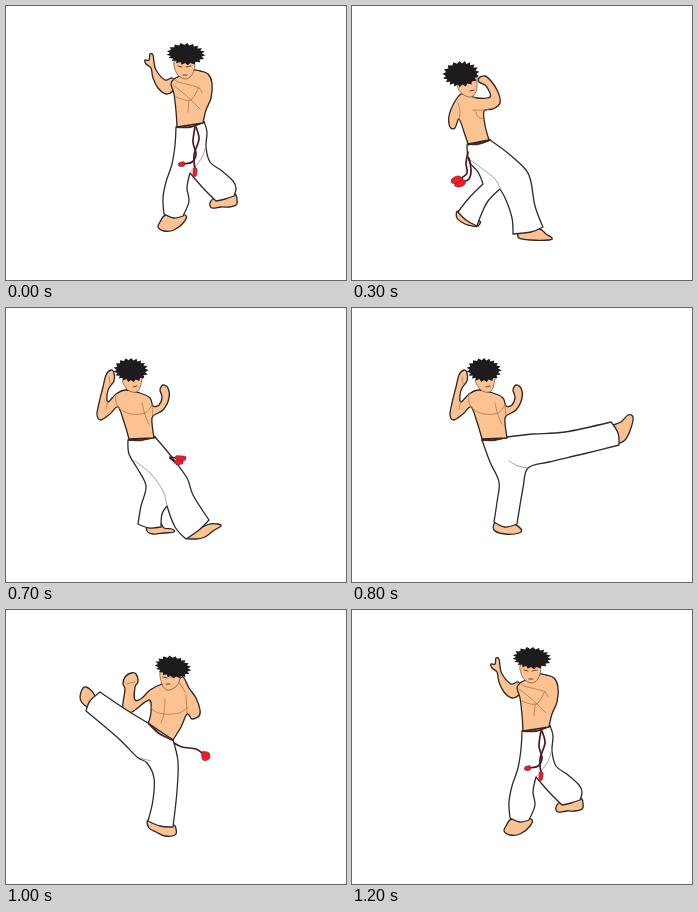
Write an HTML page that moves like this. It is 340x274 px and loops after 1700 ms.

```html
<!DOCTYPE html>
<html lang="en">
<head>
<meta charset="utf-8">
<title>Capoeira kick</title>
<style>
  html, body { margin: 0; width: 100%; height: 100%; overflow: hidden; background: #fff; }
  svg { display: block; width: 100vw; height: 100vh; }
  path { fill: none; stroke-linejoin: round; stroke-linecap: round; }
  .skin { fill: #fcc292; stroke: #2b2726; stroke-width: 1.3; }
  .face { fill: #fcc292; stroke: #6b4a38; stroke-width: .7; }
  .pants { fill: #fff; stroke: #2b2b2d; stroke-width: 1.3; }
  .cuff { fill: #97999c; stroke: #2b2b2d; stroke-width: 1; }
  .hair { fill: #1d1b1d; }
  .line { stroke: #a87a58; stroke-width: .8; }
  .fold { stroke: #8b8b8e; stroke-width: .8; }
  .mark { stroke: #4a3025; stroke-width: .9; }
  .belt { stroke: #4c2422; stroke-width: 2; }
  .cord { stroke: #4d161b; stroke-width: 1.7; }
  .red { fill: #ee1f2d; stroke: #8c1a22; stroke-width: .7; }
</style>
</head>
<body>
<svg id="stage" viewBox="0 0 340 274"></svg>
<script>
const NS = 'http://www.w3.org/2000/svg';
const OPEN = ['line', 'fold', 'mark', 'belt', 'cord'];
const LOOP = 1700;

// Smooth curve through "x,y" points; a trailing ! makes a sharp corner.
function curve(text, closed, dx, dy) {
  const pts = text.split(' ').map(s => {
    const [x, y] = s.replace('!', '').split(',').map(Number);
    return { x: x + dx, y: y + dy, sharp: s.endsWith('!') };
  });
  const n = pts.length;
  const at = i => closed ? pts[(i + n) % n] : pts[Math.max(0, Math.min(n - 1, i))];
  const handle = (i, sign) => {
    const p = at(i), a = at(i - 1), b = at(i + 1), k = p.sharp ? 0 : sign / 6;
    return `${p.x + (b.x - a.x) * k} ${p.y + (b.y - a.y) * k}`;
  };
  let d = `M${pts[0].x} ${pts[0].y}`;
  for (let i = 0; i < (closed ? n : n - 1); i++)
    d += `C${handle(i, 1)} ${handle(i + 1, -1)} ${at(i + 1).x} ${at(i + 1).y}`;
  return closed ? d + 'Z' : d;
}

// Spiky ellipse: "cx,cy rx,ry tilt".
function spikes(text, dx, dy) {
  const [cx, cy, rx, ry, tilt] = text.split(/[ ,]/).map(Number);
  const c = Math.cos(tilt * Math.PI / 180), s = Math.sin(tilt * Math.PI / 180);
  let d = '';
  for (let i = 0; i < 38; i++) {
    const a = i / 38 * 2 * Math.PI;
    const r = (i % 2 ? 1.02 : .83) + Math.sin(i * 12.9) * .06;
    const x = rx * r * Math.cos(a), y = ry * r * Math.sin(a);
    d += `${i ? 'L' : 'M'}${(cx + dx + x * c - y * s).toFixed(1)} ${(cy + dy + x * s + y * c).toFixed(1)}`;
  }
  return d + 'Z';
}

const shift = (parts, dx, dy) => parts.map(([cls, text]) => [cls, text, dx, dy]);

const guard = [
  ['skin', '166,72 159,74 150,64 148,56 147,49 144,48 143,54 139,54 140,58 145,62 147,72 152,82 160,88 167,85 172,78'],
  ['skin', '176,69 168,73 165,78 168,88 170,105 171,121! 197,117! 200,104 205,92 206,77 202,68 194,65 187,64'],
  ['line', '166,71 172,76 184,79 193,82 196,87'],
  ['line', '167,79 176,86 186,95 194,103'],
  ['line', '170,91 179,94 186,93 193,81'],
  ['line', '183,94 182,106'],
  ['face', '169,54 187,54 188,64 183,72 176,72 170,66'],
  ['mark', '172,60 176,61'], ['mark', '180,61 185,60'], ['mark', '177,69 181,69'],
  ['hair', '180,48 19,11 -2'],
];
const guardLegs = [
  ['skin', '160,209 154,216 152,221 158,225 168,224 178,216 179,209'],
  ['skin', '210,191 204,197 206,202 215,201 223,201 230,199 231,194 228,188'],
  ['pants', '170,121! 198,116! 201,126 200,141 204,156 216,165 227,175 230,182 228,190! 219,193 210,195! 197,182 184,167! 181,182 183,195 177,210! 168,212 158,208! 157,192 160,176 166,158 169,139'],
  ['fold', '200,140 195,153 184,167'],
  ['belt', '171,121 184,121 198,116'],
  ['cord', '190,121 193,133 188,149 189,164'],
  ['cord', '189,121 187,136 190,148 186,156 177,158'],
  ['red', '178,156 173,157 173,160 178,160'],
  ['red', '188,162 187,169 190,170 191,163'],
];

const left = [
  ['skin', '113,91 122,90 134,82 136,73 141,67 145,67 145,75 139,82 133,93 126,100 119,99 113,96'],
  ['skin', '102,75 89,76 82,82 81,96 84,108 85,118 83,127! 106,133! 109,118 113,101 120,92 120,84 115,80 110,80'],
  ['line', '92,90 91,98 88,107'], ['line', '88,109 99,103 107,95 117,91'],
  ['line', '91,98 104,91 112,86'], ['line', '110,101 108,112 105,121'],
  ['face', '100,68 119,66 119,76 115,81 109,84 103,80 101,76'],
  ['mark', '108,73 112,73'], ['mark', '115,72 118,71'], ['mark', '112,79 115,78'],
  ['hair', '110,62 17,12 6'],
];
const leftLegs = [
  ['cord', '86,150 81,158 79,164'], ['cord', '84,154 79,160 75,164'],
  ['red', '67,165 74,162 77,166 71,170 67,169'],
  ['red', '75,167 82,165 82,170 77,172 73,171'],
  ['skin', '72,221 69,228 76,235 84,238 93,238 95,234 91,229'],
  ['skin', '103,216 112,220 123,219 127,216 125,212 119,211'],
  ['pants', '84,126! 106,133! 107,154 112,177 118,199 122,214! 112,217 99,219 90,231! 78,227 66,215! 77,198 88,176 80,155 76,143 79,132'],
  ['fold', '111,172 110,188 104,205 98,219'],
  ['belt', '84,127 94,132 106,133'],
];

const back = [
  ['skin', '109,88 102,97 97,110 98,121 103,122 107,113 112,126 116,138! 137,134! 133,119 132,105 141,103 148,97 146,86 139,75 133,70 127,72 127,76 133,79 136,83 138,91 125,92 116,89'],
  ['line', '106,97 108,105 107,114'], ['line', '121,104 133,104 140,102'],
  ['line', '123,92 114,88'], ['line', '124,106 126,111 132,113'],
  ['face', '106,74 123,67 125,77 124,86 119,91 112,89 107,84'],
  ['mark', '114,77 117,76'], ['mark', '120,75 123,74'], ['mark', '118,85 122,84'],
  ['hair', '109,68 18,13 -14'],
];
const backLegs = [
  ['skin', '107,205 105,212 113,218 120,220 126,220 127,214'],
  ['skin', '168,226 167,232 178,234 197,234 200,232 194,228 187,223'],
  ['pants', '115,139! 138,134! 157,148 174,164 179,176 183,200 191,221! 179,226 161,228! 160,212 154,194 148,183! 136,195 129,209 125,220! 114,214 106,206! 117,192 131,178! 126,166 117,155'],
  ['fold', '118,154 132,164 143,173 149,184'],
  ['belt', '116,138 126,138 138,134'],
  ['cord', '116,146 114,157 115,167 108,173'], ['cord', '117,152 119,164 117,173 111,176'],
  ['red', '100,173 106,170 111,173 107,177 100,177'],
  ['red', '104,177 112,174 113,178 108,181 103,180'],
];

const open = [
  ['skin', '119,82 110,86 102,94 101,87 103,80 108,73 108,65 105,62 100,67 97,79 93,95 91,107 95,112 104,106 112,99 118,114 123,131! 148,130! 146,115 147,108 157,102 163,90 162,80 157,77 154,82 156,89 153,97 147,98 144,90 134,85'],
  ['line', '110,86 110,94 114,101 125,106 139,105 146,97'], ['line', '136,95 139,107 143,116'],
  ['line', '102,93 100,101'], ['line', '146,97 147,108'], ['line', '103,69 104,76'],
  ['face', '117,70 135,65 135,76 132,83 126,84 120,80'],
  ['mark', '123,71 127,71'], ['mark', '130,70 134,69'], ['mark', '127,79 131,78'],
  ['hair', '125,62 17,12 -6'],
];
const openLegs = [
  ['skin', '142,217 141,223 147,226 158,225 168,224 166,221 158,220 154,215'],
  ['skin', '180,229 190,231 199,229 207,223 215,218 211,216 201,217'],
  ['pants', '122,132! 149,129! 165,148 181,170 187,187 203,212! 193,222 180,231! 169,219 161,198! 156,206 155,219! 143,220 132,216! 135,198 140,178 131,160 123,146'],
  ['fold', '129,153 145,166 157,183 161,198'],
  ['belt', '123,132 136,132 149,129'],
  ['cord', '164,149 170,150'], ['cord', '164,150 169,154'],
  ['red', '170,148 176,148 180,149 178,153 171,152'],
  ['red', '168,153 174,152 177,155 171,157'],
];

const highKick = [
  ['skin', '154,79 140,84 127,96 127,87 133,80 137,74 134,71 126,71 121,76 120,90 118,107 124,112 138,103 141,116 139,140 169,133 174,105 187,112 198,118 203,108 207,95 207,83 201,77 196,78 201,90 199,100 190,99 176,86'],
  ['line', '137,89 138,96 145,103 155,106'], ['line', '127,95 124,103'], ['line', '125,75 130,78'],
  ['face', '150,66 160,66 160,80 154,78'],
  ['hair', '154,64 9,13 0'],
  ['cord', '170,129 180,137 184,142 192,143'], ['cord', '169,131 177,139 182,147 190,150'],
  ['red', '193,142 200,141 202,144 198,147 192,146'],
  ['red', '189,147 196,147 199,149 194,152 189,151'],
  ['skin', '149,214 144,222 153,226 167,225 171,221'],
  ['pants', '160,49! 170,46 185,51! 180,85 175,108 168,130 174,145 184,165 185,184 177,203 169,221! 157,219 144,207! 152,192 161,173! 148,163 138,145 140,134 149,122 155,96 159,68'],
  ['fold', '140,143 148,155 164,166'], ['fold', '169,128 167,146'],
  ['cuff', '160,49 162,44 173,44 184,48 185,52 181,56 170,54'],
  ['skin', '169,48 171,42 167,37 171,33 178,32 183,35 180,40 178,48'],
  ['line', '171,41 180,40'],
];

const low = [
  ['skin', '157,68 145,74 137,82 130,84 130,71 133,66 131,58 126,57 120,61 118,68 120,73 118,87 118,97 127,96 144,84 146,96 143,108! 168,124! 176,111 182,98 187,103 194,100 195,94 191,82 184,72 178,61 171,65'],
  ['line', '144,84 148,94 159,98 174,97 183,91'], ['line', '160,83 159,97 156,107'],
  ['line', '181,79 182,97'], ['line', '121,68 130,66'], ['line', '174,66 180,76'],
  ['face', '156,55 174,56 174,66 169,72 162,74 157,68'],
  ['mark', '158,61 162,62'], ['mark', '166,61 170,60'], ['mark', '161,68 165,68'],
  ['hair', '168,51 18,11 5'],
];
const lowLegs = [
  ['cord', '167,126 175,132 188,133 199,139'], ['cord', '168,130 179,135 189,136 197,146'],
  ['red', '199,139 204,141 203,148 199,148'],
  ['red', '196,145 201,146 202,152 198,153'],
  ['skin', '54,151 46,153 45,158 51,164 57,171 60,168 60,160'],
  ['skin', '143,210 143,218 150,222 159,226 169,225 170,219 166,214'],
  ['pants', '143,106! 168,124! 170,145 168,181 166,217! 154,215 142,210! 146,192 148,168 142,145 134,136 120,139 106,147 87,152 74,168! 60,161 52,149! 70,139 96,128 119,115'],
  ['fold', '134,136 128,137'],
  ['belt', '144,108 155,118 168,124'],
  ['fold', '143,109 142,113 146,114'], ['fold', '158,121 160,126 163,123'],
];

const stepLegs = [
  ['cord', '101,146 97,157 96,169 91,173'], ['red', '84,172 93,170 96,175 88,179'],
  ['skin', '92,212 88,219 96,226 107,227 110,222'],
  ['skin', '146,221 147,227 160,229 173,228 175,225 165,219'],
  ['pants', '101,138! 124,134! 139,153 152,172 158,194 167,218! 154,223 141,222! 138,204 128,184! 118,199 110,222! 99,220 89,212! 99,195 112,178! 105,163 100,150'],
  ['fold', '107,157 121,170 128,184'], ['belt', '102,138 112,138 124,134'],
];
const crossLegs = [
  ['red', '111,167 118,165 120,170 114,172'], ['cord', '126,145 122,156 118,166'],
  ['skin', '117,210 114,217 123,222 133,223 136,218'],
  ['skin', '168,226 168,232 180,235 197,234 200,231 188,223'],
  ['pants', '125,130! 150,128! 165,146 176,166 182,194 192,220! 180,226 162,228! 160,210 153,186! 142,198 136,219! 125,217 115,210! 124,194 136,177! 128,159 123,144'],
  ['fold', '128,151 144,167 153,186'], ['belt', '125,130 138,131 150,128'],
];
const swingLegs = [
  ['skin', '144,214 142,222 153,226 167,225 169,221 159,215'],
  ['skin', '260,119 269,114 276,107 281,109 279,120 273,132 265,134'],
  ['pants', '130,132! 155,129! 181,126 213,124 259,114! 266,125 267,137! 231,146 197,154 176,160 171,180 165,216! 153,219 142,214! 145,194 147,174 138,154'],
  ['fold', '157,153 166,158 176,160'], ['belt', '130,132 143,132 155,129'],
];
const fallLegs = [
  ['cord', '166,132 176,137 190,139 197,144'], ['red', '196,142 203,143 203,149 197,150'],
  ['skin', '88,84 80,77 75,82 75,91 83,98 90,96'],
  ['skin', '143,210 143,218 150,222 159,226 169,225 170,219 166,214'],
  ['pants', '142,113! 167,130! 172,152 171,181 167,217! 154,216 142,211! 147,190 148,168 141,153 131,147 112,128 80,101! 84,91 94,82! 119,99'],
  ['fold', '134,148 145,151'], ['belt', '143,114 154,124 167,130'],
];

const steps = [
  [0, [...guardLegs, ...guard]],
  [100, [...leftLegs, ...left]],
  [200, [...stepLegs, ...shift(back, -14, 0)]],
  [300, [...backLegs, ...back]],
  [500, [...crossLegs, ...shift(open, 2, -1)]],
  [700, [...openLegs, ...open]],
  [800, [...swingLegs, ...shift(open, 7, 0)]],
  [900, highKick],
  [1000, [...shift(low, -1, 6), ...fallLegs]],
  [1100, [...lowLegs, ...low]],
  [1200, [...guardLegs, ...guard]],
];

const stage = document.getElementById('stage');
const poses = steps.map(([, parts]) => {
  const g = stage.appendChild(document.createElementNS(NS, 'g'));
  for (const [cls, text, dx = 0, dy = 0] of parts) {
    const path = g.appendChild(document.createElementNS(NS, 'path'));
    path.setAttribute('class', cls);
    path.setAttribute('d', cls === 'hair' ? spikes(text, dx, dy) : curve(text, !OPEN.includes(cls), dx, dy));
  }
  return g;
});

function draw() {
  const t = performance.now() % LOOP;
  const now = steps.findLastIndex(([start]) => start <= t);
  poses.forEach((g, i) => g.style.display = i === now ? '' : 'none');
  requestAnimationFrame(draw);
}
draw();
</script>
</body>
</html>
```
